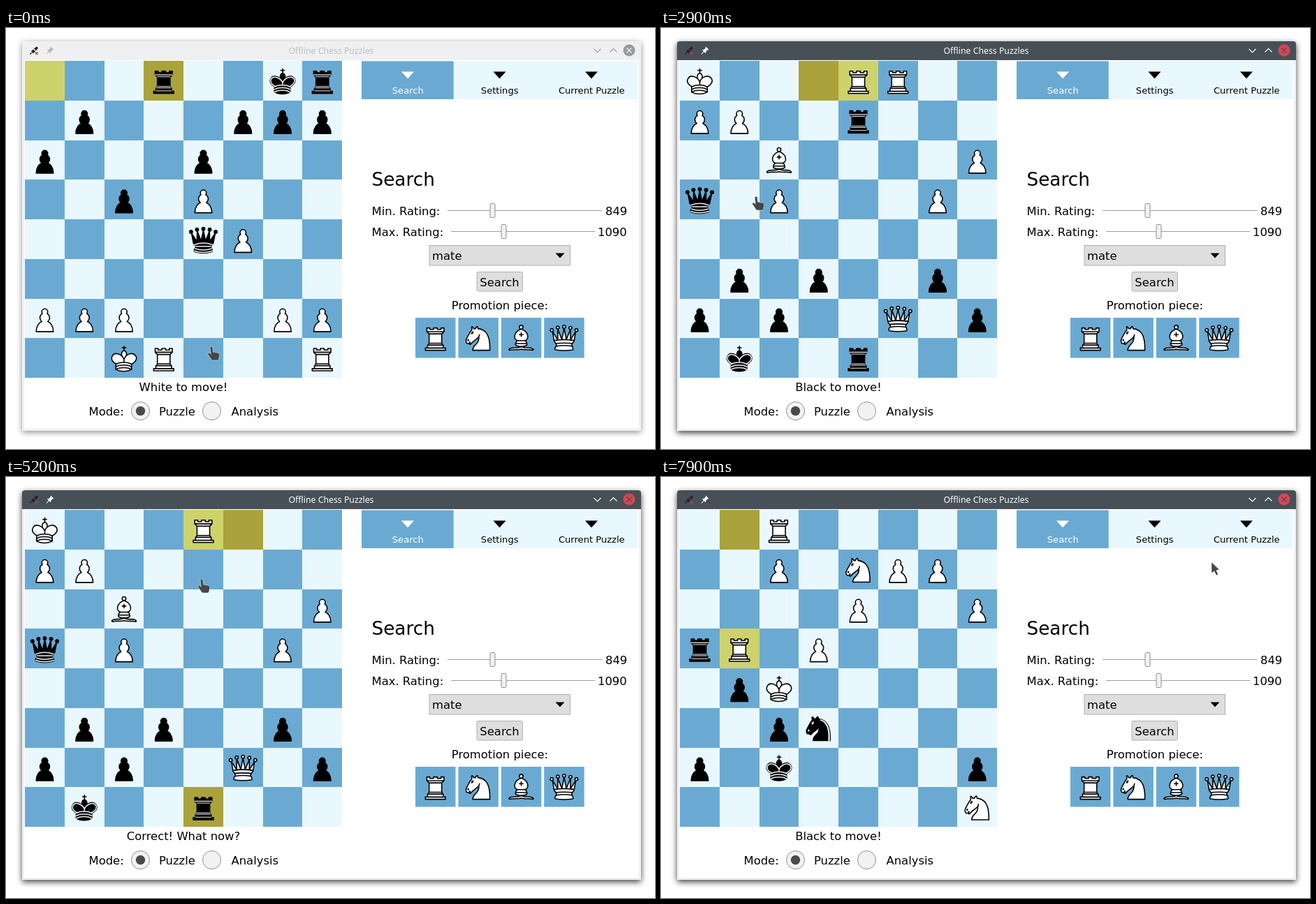
Recreate the animation shown at these times as an HTML page. Size 929 by 603 pixels, loop 8000 ms.

```html
<!DOCTYPE html>
<html lang="en">
<head>
<meta charset="utf-8">
<title>Offline Chess Puzzles</title>
<style>
  html, body { margin: 0; width: 100%; height: 100%; overflow: hidden; background: #fff; }
  .shadow { position: absolute; left: 23px; top: 19px; width: 886px; height: 558px; border-radius: 4px 4px 0 0; }
  #shadowIdle { box-shadow: 0 2px 8px rgba(0, 0, 0, .45); }
  #shadowActive { box-shadow: 0 3px 9px rgba(0, 0, 0, .75); }
  svg { position: absolute; left: 0; top: 0; }
  text { font: 16.4px "DejaVu Sans", sans-serif; fill: #000; }
  .mid { text-anchor: middle; }
  .tab { font-size: 13.1px; text-anchor: middle; }
  .title { font: 12.3px "Noto Sans", sans-serif; text-anchor: middle; }
  .piece { stroke: #000; stroke-width: 1.5; stroke-linecap: round; stroke-linejoin: round; }
  .white { fill: #fff; }
  .black { fill: #000; }
  .line { fill: none; }
  .pale { fill: none; stroke: #ececec; }
  .rail { stroke: #a0a0a0; }
  .knob, .radio { fill: #f2f2f2; stroke: #8c8c8c; }
  .control { fill: #dedede; stroke: #b0b0b0; }
</style>
</head>
<body>
<div class="shadow" id="shadowIdle"></div>
<div class="shadow" id="shadowActive"></div>
<svg width="929" height="603" viewBox="0 0 929 603">
  <defs>
    <path id="pawn" d="M22.5 9c-2.21 0-4 1.79-4 4 0 .89.29 1.71.78 2.38C17.33 16.5 16 18.59 16 21c0 2.03.94 3.84 2.41 5.03-3 1.06-7.41 5.55-7.41 13.47h23c0-7.92-4.41-12.41-7.41-13.47 1.47-1.19 2.41-3 2.41-5.03 0-2.41-1.33-4.5-3.28-5.62.49-.67.78-1.49.78-2.38 0-2.21-1.79-4-4-4z"/>
    <path id="rook" d="M9 39h27v-3H9zM12 36v-4h21v4zM12.5 32l1.5-2.5h17l1.5 2.5zM14 29.5V17h17v12.5zM14 17l-3-3h23l-3 3zM11 14V9h4v2h5V9h5v2h5V9h4v5z"/>
    <path id="queenBase" d="M9 26c0 2 1.5 2 2.5 4 1 1.5 1 1 .5 3.5-1.5 1-1.5 2.5-1.5 2.5-1.5 1.5.5 2.5.5 2.5 6.5 1 16.5 1 23 0 0 0 1.5-1 0-2.5 0 0 .5-1.5-1-2.5-.5-2.5-.5-2 .5-3.5 1-2 2.5-2 2.5-4-8.5-1.5-18.5-1.5-27 0z"/>
    <path id="kingBody" d="M11.5 37c5.5 3.5 15.5 3.5 21 0v-7s9-4.5 6-10.5c-4-6.5-13.5-3.5-16 4V27v-3.5c-3.5-7.5-13-10.5-16-4-3 6 5 10 5 10V37z"/>
    <path id="kingBands" d="M11.5 30c5.5-3 15.5-3 21 0M11.5 33.5c5.5-3 15.5-3 21 0M11.5 37c5.5-3 15.5-3 21 0"/>
    <g id="kingTop"><path class="line" d="M22.5 11.63V6M20 8h5"/>
      <path d="M22.5 25s4.5-7.5 3-10.5c0 0-1-2.5-3-2.5s-3 2.5-3 2.5c-1.5 3 3 10.5 3 10.5"/></g>
    <g id="knight"><path d="M22 10c10.5 1 16.5 8 16 29H15c0-9 10-6.5 8-21"/>
      <path d="M24 18c.38 2.91-5.55 7.37-8 9-3 2-2.82 4.34-5 4-1.042-.94 1.41-3.04 0-3-1 0 .19 1.23-1 2-1 0-4.003 1-4-4 0-2 6-12 6-12s1.89-1.9 2-3.5c-.73-.994-.5-2-.5-3 1-1 3 2.5 3 2.5h2s.78-1.992 2.5-3c1 0 1 3 1 3"/></g>
    <path id="knightEye" d="M9.5 25.5a.5.5 0 1 1-1 0 .5.5 0 1 1 1 0zM14.933 15.75a.5 1.5 30 1 1-.866-.5.5 1.5 30 1 1 .866.5z"/>

    <g id="wP" class="piece white"><use href="#pawn"/></g>
    <g id="bP" class="piece black"><use href="#pawn"/></g>
    <g id="wR" class="piece white"><use href="#rook"/></g>
    <g id="bR" class="piece black"><use href="#rook"/>
      <path class="pale" stroke-width="1" style="stroke-width:1" d="M12 35.5h21M13 31.5h19M14 29.5h17M14 16.5h17M11 14h23"/></g>
    <g id="wN" class="piece white"><use href="#knight"/><use href="#knightEye" fill="#000"/></g>
    <g id="bN" class="piece black"><use href="#knight"/><use href="#knightEye" class="pale"/>
      <path fill="#ececec" stroke="none" style="stroke:none" d="M24.55 10.4l-.45 1.45.5.15c3.15 1 5.65 2.49 7.9 6.75S35.75 29.06 35.25 39l-.05.5h2.25l.05-.5c.5-10.06-.88-16.85-3.25-21.34-2.37-4.49-5.79-6.64-9.19-7.16z"/></g>
    <g id="wB" class="piece white">
      <path d="M9 36c3.39-.97 10.11.43 13.5-2 3.39 2.43 10.11 1.03 13.5 2 0 0 1.65.54 3 2-.68.97-1.65.99-3 .5-3.39-.97-10.11.46-13.5-1-3.39 1.46-10.11.03-13.5 1-1.354.49-2.323.47-3-.5 1.354-1.94 3-2 3-2z"/>
      <path d="M15 32c2.5 2.5 12.5 2.5 15 0 .5-1.5 0-2 0-2 0-2.5-2.5-4-2.5-4 5.5-1.5 6-11.5-5-15.5-11 4-10.5 14-5 15.5 0 0-2.5 1.5-2.5 4 0 0-.5.5 0 2z"/>
      <circle cx="22.5" cy="8" r="2.5"/><path class="line" d="M17.5 26h10M15 30h15m-7.5-14.5v5M20 18h5"/></g>
    <g id="wQ" class="piece white">
      <circle cx="6" cy="12" r="2"/><circle cx="14" cy="8.5" r="2"/><circle cx="22.5" cy="7.5" r="2"/><circle cx="31" cy="9" r="2"/><circle cx="39" cy="12" r="2"/>
      <path d="M9 26c8.5-1.5 21-1.5 27 0l2-12-7 11V11l-5.5 13.5-3-15-3 15-5.5-14V25L7 14z"/><use href="#queenBase"/>
      <path class="line" d="M11.5 30c3.5-1 18.5-1 22 0M12 33.5c6-1 15-1 21 0"/></g>
    <g id="bQ" class="piece black">
      <g style="stroke:none"><circle cx="6" cy="12" r="2.75"/><circle cx="14" cy="9" r="2.75"/><circle cx="22.5" cy="8" r="2.75"/><circle cx="31" cy="9" r="2.75"/><circle cx="39" cy="12" r="2.75"/></g>
      <path d="M9 26c8.5-1.5 21-1.5 27 0l2.5-12.5L31 25l-.3-14.1-5.2 13.6-3-14.5-3 14.5-5.2-13.6L14 25 6.5 13.5z"/><use href="#queenBase"/>
      <path class="line" d="M11 38.5a35 35 1 0 0 23 0"/>
      <path class="pale" d="M11 29a35 35 1 0 1 23 0M12.5 31.5h20M11.5 34.5a35 35 1 0 0 22 0M10.5 37.5a35 35 1 0 0 24 0"/></g>
    <g id="wK" class="piece white"><use href="#kingTop"/><use href="#kingBody"/><use href="#kingBands" class="line"/></g>
    <g id="bK" class="piece black"><use href="#kingTop"/><use href="#kingBody"/>
      <path class="pale" d="M32 29.5s8.5-4 6.03-9.65C34.15 14 25 18 22.5 24.5v2.1-2.1C20 18 9.906 14 6.997 19.85c-2.497 5.65 4.853 9 4.853 9"/><use href="#kingBands" class="pale"/></g>

    <path id="bar" d="M23 46V23q0-4 4-4H905q4 0 4 4V46z"/>
    <path id="chevrons" d="M841.5 30l5 5 5-5M864.5 34.500l5-5 5 5" fill="none" stroke-width="1.2"/>
    <path id="cross" d="M888.500 28.500l7 7m0-7l-7 7" stroke-width="1.2"/>
    <path id="pin" d="M64 26.500l4.500 4.500-2 .5-2.200 2.200-.3 2.800-2.200-2.200-4 3.700-.4-.4 3.500-4.200-2.200-2.200 2.800-.2 2.200-2.300z"/>
    <g id="plug"><path d="M34.500 37.500l2-2" stroke="#222" stroke-width="1.500"/><path d="M36 33.500l3-3 3 3-3 3zM40 29.500l4-3 2 2-3 4z" fill="#222"/><path d="M42 34.500l3.500 3.500m0-3.500l-3.500 3.500" stroke="#c33" stroke-width="1.200"/></g>
  </defs>

  <path d="M23 577V23q0-4 4-4H905q4 0 4 4V577z" fill="#eff0f1"/>
  <rect x="26" y="46" width="880" height="528" fill="#fff"/>
  <g id="titleIdle">
    <use href="#bar" fill="#eff0f1"/><use href="#plug"/><use href="#pin" fill="#b4b8bb"/>
    <text class="title" x="465.500" y="37" style="fill:#bcc0c3">Offline Chess Puzzles</text>
    <use href="#chevrons" stroke="#9da2a5"/><circle cx="892" cy="32" r="8.500" fill="#979c9f"/><use href="#cross" stroke="#eff0f1"/>
  </g>
  <g id="titleActive">
    <use href="#bar" fill="#475057"/><use href="#plug"/><use href="#pin" fill="#fcfcfc"/>
    <text class="title" x="465.500" y="37" style="fill:#fcfcfc">Offline Chess Puzzles</text>
    <use href="#chevrons" stroke="#fcfcfc"/><circle cx="892" cy="32" r="8.500" fill="#da4453"/><use href="#cross" stroke="#475057"/>
  </g>

  <g id="board"></g>
  <text id="status" class="mid" x="254" y="519.500"></text>
  <text x="118.500" y="554.500">Mode:</text>
  <circle class="radio" cx="192.500" cy="548.500" r="13"/><circle cx="192.500" cy="548.500" r="6.700" fill="#4a4a4a"/>
  <text x="219" y="554.500">Puzzle</text>
  <circle class="radio" cx="294.500" cy="548.500" r="13"/>
  <text x="322.500" y="554.500">Analysis</text>

  <rect x="509" y="47.500" width="395" height="54.500" fill="#e9f7ff"/>
  <rect x="509" y="47.500" width="131.700" height="54.500" fill="#6aaad2"/>
  <path d="M566 62.500h18l-9 10z" fill="#fff"/><path d="M697.500 62.500h18l-9 10zM829 62.500h18l-9 10z"/>
  <text class="tab" x="575.300" y="94.300" style="fill:#fff">Search</text>
  <text class="tab" x="706.700" y="94.300">Settings</text>
  <text class="tab" x="838.300" y="94.300">Current Puzzle</text>

  <text x="523.500" y="226.300" style="font-size:26.3px">Search</text>
  <text x="523.500" y="267.500">Min. Rating:</text>
  <path class="rail" d="M632 261.500H853.500M637 291.500H843.500"/>
  <rect class="knob" x="693" y="251.500" width="7" height="20" rx="2"/>
  <text x="858" y="267.500">849</text>
  <text x="523.500" y="297.500">Max. Rating:</text>
  <rect class="knob" x="709" y="281.500" width="7" height="20" rx="2"/>
  <text x="847" y="297.500">1090</text>
  <rect class="control" x="606" y="311.500" width="201.500" height="28.500"/>
  <text x="610" y="331.500">mate</text><path d="M786.500 322.500h13l-6.500 7z"/>
  <rect class="control" x="674" y="349.500" width="65.500" height="27.500" rx="2"/>
  <text class="mid" x="706.500" y="369.500">Search</text>
  <text class="mid" x="707" y="402.500">Promotion piece:</text>
  <g id="promotion"></g>

  <g id="cursor">
    <path id="hand" fill="#43474a" stroke="#fff" stroke-opacity=".6" stroke-width=".8" d="M5 1.500c1.500-.8 2.800 0 3 1.500l.6 6 6.500 1.200c2 .4 2.800 1.500 2.600 3.200l-.9 5c-.3 1.600-1 2.600-2.600 2.600H8.500c-1.400 0-2.300-.6-3-1.800L1 12.500c-.8-1.500.8-3 2.300-2l2 1.600L4.200 3.300c-.1-.8.2-1.500.8-1.800z"/>
    <path id="arrow" fill="#43474a" stroke="#fff" stroke-opacity=".6" stroke-width=".8" d="M1 1v16l3.800-3.200 2.900 6 2.900-1.400-2.800-5.800 4.700-.6z"/>
  </g>
</svg>
<script>
const LOOP = 8000, STEP = 100, CELL = 56.75;
const $ = id => document.getElementById(id);

const skewer = "3r2kr/1p3ppp/p3p3/2p1P3/4qP2/8/PPP3PP/2KR3R";
const stack = "K3RR2/PP2r3/2B4P/q1P3P1/8/1p1p2p1/p1p2Q1p/1k2r3";
const stackTaken = "K3R3/PP6/2B4P/q1P3P1/8/1p1p2p1/p1p2Q1p/1k2r3";
const queenLeft = "K3B3/PP6/7P/q1P3P1/8/1p1p2p1/p1p2Q1p/1k6";
const endgame = "2R5/2P1NPP1/4P2P/rR1P4/1pK5/2pn4/p1k4p/7N";
const white = "White to move!", black = "Black to move!", correct = "Correct! What now?";

// start time, position, marked squares (column and row), status
const scenes = [
  [0, skewer, "00 30", white],
  [400, skewer, "00 30 37", white],
  [1500, stack, "30 40", black],
  [3300, stack, "30 40 41", black],
  [3900, stackTaken, "40 50", correct],
  [4800, stackTaken, "40 50 47", correct],
  [5700, queenLeft, "40 22", correct],
  [6200, queenLeft, "40 22 03", correct],
  [7100, queenLeft, "40 22 03 30", correct],
  [7300, endgame, "10 13", black],
];

// time, left, top of the pointer
const path = [
  [0, 288, 455], [300, 222, 466], [400, 220, 464], [500, 224, 430], [800, 225, 232],
  [900, 213, 162], [1000, 203, 115], [1200, 193, 77], [1700, 193, 77], [2000, 215, 125],
  [2400, 135, 232], [2500, 135, 232], [2600, 104, 246], [2800, 104, 246], [2900, 130, 240],
  [3300, 274, 134], [3400, 276, 128], [3700, 280, 67], [3800, 280, 67], [4300, 251, 366],
  [4600, 272, 485], [4800, 274, 489], [4900, 274, 440], [5200, 274, 145], [5500, 277, 74],
  [5600, 277, 74], [6100, 47, 241], [6400, 53, 237], [6500, 101, 215], [6900, 208, 76],
  [7200, 208, 76], [7500, 390, 88], [7800, 765, 118], [7900, 787, 121],
];

const pieceAt = (name, x, y) =>
  `<use href="#${name}" transform="translate(${x} ${y}) scale(1.067)"/>`;

const square = (c, r, fill) => {
  const edge = (start, i) => Math.round(start + i * CELL);
  const x = edge(27, c), y = edge(47.2, r);
  return `<rect x="${x}" y="${y}" width="${edge(27, c + 1) - x}" height="${edge(47.2, r + 1) - y}" fill="${fill}"/>`;
};

function drawBoard([, position, marks, status]) {
  let squares = "", pieces = "";
  position.split("/").forEach((row, r) => {
    const cells = row.replace(/\d/g, n => " ".repeat(n));
    for (let c = 0; c < 8; c++) {
      const light = (c + r) % 2 === 0;
      const marked = marks.includes(`${c}${r}`);
      squares += square(c, r, marked ? (light ? "#cdd26a" : "#aaa23a") : (light ? "#e9f7ff" : "#6aaad2"));
      const kind = cells[c], upper = kind.toUpperCase();
      if (kind !== " ")
        pieces += pieceAt((kind === upper ? "w" : "b") + upper, 27 + c * CELL + 4.5, 47.2 + r * CELL + 5);
    }
  });
  $("board").innerHTML = squares + pieces;
  $("status").textContent = status;
}

function pointerAt(t) {
  const i = path.findIndex(key => key[0] > t);
  if (i < 0) return path[path.length - 1].slice(1);
  const [t0, x0, y0] = path[i - 1], [t1, x1, y1] = path[i];
  const k = (t - t0) / (t1 - t0);
  return [x0 + (x1 - x0) * k, y0 + (y1 - y0) * k];
}

$("promotion").innerHTML = [..."RNBQ"].map((kind, i) => {
  const x = 586 + i * 61.4;
  return `<rect x="${x}" y="415" width="57.5" height="57.5" fill="#6aaad2"/>` + pieceAt("w" + kind, x + 4.7, 420);
}).join("");

let shown;
function render(now) {
  const t = Math.floor(now % LOOP / STEP) * STEP;
  const scene = scenes.filter(s => s[0] <= t).pop();
  if (scene !== shown) drawBoard(shown = scene);

  const focus = Math.min(1, Math.max(0, (t - 300) / 200));
  $("titleActive").style.opacity = $("shadowActive").style.opacity = focus;
  $("shadowIdle").style.opacity = 1 - focus;

  const [x, y] = pointerAt(t);
  const onBoard = x < 476;
  $("cursor").setAttribute("transform", `translate(${x} ${y})`);
  $("hand").style.display = onBoard ? "" : "none";
  $("arrow").style.display = onBoard ? "none" : "";
}

function tick() {
  render(performance.now());
  requestAnimationFrame(tick);
}
tick();
</script>
</body>
</html>
```
